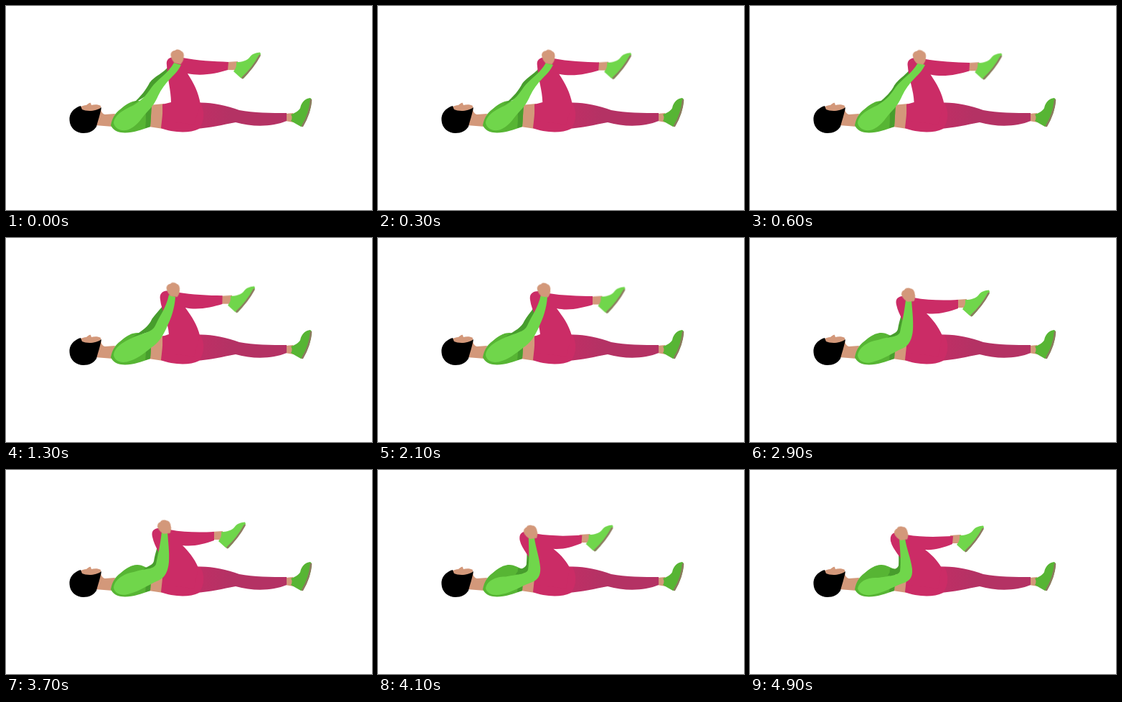
These frames come from a looping animation (510x284 px, 5000 ms). An HTML page without scripts:

```html
<!DOCTYPE html>
<html lang="en">
<head>
<meta charset="utf-8">
<title>Knee to chest stretch</title>
<style>
html, body { margin: 0; width: 100%; height: 100%; overflow: hidden; background: #fff; }
svg { display: block; width: 100vw; height: 100vh; }
.skin { fill: #d3987a; }
.pink { fill: #cb2c66; }
.green { fill: #57b534; }
.shade { fill: #479d2d; }
.light { fill: #70d64b; }
.sole { fill: none; stroke: #8d7a60; stroke-width: 2.6; stroke-linecap: round; }
.move { animation: 5s linear infinite; }
#leg { animation-name: leg; }
#arm { animation-name: arm; }
#back { animation-name: back; }
#foot { animation-name: foot; }
#hand { animation-name: hand; }

@keyframes foot {
  0% { transform: translate(0, 0); }
  34%, 42% { transform: translate(-10.5px, 3.5px); }
  48%, 74% { transform: translate(-21px, 8px); }
  84%, 100% { transform: translate(-29px, 13px); }
}
@keyframes hand {
  0% { transform: translate(238.5px, 70px) rotate(0deg); }
  34%, 42% { transform: translate(231px, 72px) rotate(-6deg); }
  48%, 74% { transform: translate(220.5px, 79px) rotate(-18deg); }
  84%, 100% { transform: translate(210.5px, 88px) rotate(-22deg); }
}
@keyframes leg {
  0% { d: path("M246 72C266 76 290 77 310 78L309 89C293 94 273 98 253 94C262 108 268 120 271 137L262 165L219 160L218 137L230 134C230 118 225 102 224 82C222 71 234 69 246 72Z"); }
  34%, 42% { d: path("M238 77C256 80 280 81 299 81L299 93C285 97 266 102 249 98C258 110 266 121 270 136L262 165L219 160L218 137L226 134C225 116 214 102 212 86C210 74 222 71 238 77Z"); }
  48%, 74% { d: path("M228 83C248 87 270 87 290 86L290 98C276 103 261 107 246 105C254 113 262 122 268 136L262 165L219 160L218 140L219 134C218 120 207 108 204 93C201 81 212 78 228 83Z"); }
  84%, 100% { d: path("M218 90C240 94 263 93 283 92L282 103C270 108 256 112 244 111C252 117 260 124 267 136L262 165L219 160L218 142L216 134C212 122 199 112 196 99C194 86 205 84 218 90Z"); }
}
@keyframes arm {
  0% { d: path("M234 79L244 82C240 90 235 95 230 100C222 108 216 116 212 125C208 134 204 140 198 146C190 154 184 166 173 171C163 176 152 172 150 163C151 151 165 144 178 138C191 130 197 122 203 113C211 102 226 94 234 79Z"); }
  34%, 42% { d: path("M227 79L236 82C235 98 230 112 225 122C220 134 214 144 206 150C196 157 186 167 173 171C163 175 152 173 150 163C151 151 165 144 178 138C192 132 204 131 208 122C214 108 223 98 227 79Z"); }
  48%, 74% { d: path("M217 86L225 86C226 100 228 115 227 128C226 140 222 150 212 154C198 160 186 169 173 172C162 176 152 173 150 164C151 152 165 144 178 142C192 137 206 139 209 131C212 116 215 104 217 86Z"); }
  84%, 100% { d: path("M208 95L216 95C218 110 224 122 226 138C227 150 222 155 212 158C198 163 186 171 173 173C163 176 152 173 150 165C152 154 165 149 178 150C192 148 207 147 209 141C211 128 209 112 208 95Z"); }
}
@keyframes back {
  0% { d: path("M230 79L238 81L207 118L174 138C184 130 193 120 199 109C204 98 223 93 230 79Z"); }
  34%, 42% { d: path("M226 81L232 82L211 130L177 138C187 131 197 127 202 119C207 108 219 98 226 81Z"); }
  48%, 74% { d: path("M213 89L219 89L212 135L190 140C196 133 204 134 206 127C208 113 213 106 213 89Z"); }
  84%, 100% { d: path("M206 96L213 96L212 144L192 147C196 138 205 139 207 133C208 120 206 110 206 96Z"); }
}
</style>
</head>
<body>
<svg viewBox="0 0 510 284" preserveAspectRatio="none">
  <defs>
    <linearGradient id="far" gradientUnits="userSpaceOnUse" x1="266" y1="0" x2="312" y2="0">
      <stop stop-color="#c02e65"/>
      <stop offset="1" stop-color="#b43264"/>
    </linearGradient>
  </defs>

  <!-- head and neck -->
  <path class="skin" d="M102 142C105 139 109 138 112 138C114 137 116 134 118 135L119 138C123 137 129 137 132 139C132 145 133 150 138 151L152 150L149 168L124 166L106 155Z"/>
  <path d="M104 139C94 142 87.500 150 88.500 159C89 170 98 177 108 177C116 177 122 174 126 168C128 160 131 152 133 141C126 147 112 147 106 144Z"/>

  <!-- torso -->
  <path class="skin" d="M200 138L220 136L219 171L199 168Z"/>
  <path class="green" d="M146 166C148 156 152 149 159 144C166 138 174 132 183 132C191 132 196 137 203 138C202 148 202 158 201 168C188 173 172 178 160 176C153 175 148 171 146 166Z"/>
  <path class="shade" d="M195 137L203 138C202 148 202 158 201 168L194 170C196 158 194 148 195 137Z"/>
  <path id="back" class="shade move"/>

  <!-- straight leg -->
  <path class="skin" d="M389 150L400 149L401 162L389 160Z"/>
  <path fill="url(#far)" d="M262 135C282 133 305 138 325 145C345 149 370 149 391 149L391 160C372 168 345 169 320 162C302 165 286 170 262 171Z"/>
  <path class="green" d="M397 151C403 149 408 146 410 142C412 133 417 129 424 128L426 130C426 142 420 158 414 167L411 168L397 160Q400 155 397 151Z"/>
  <path class="sole" d="M425 131C424 144 419 157 413 167"/>
  <path class="pink" d="M218 137C232 134 252 134 271 135C277 146 277 160 269 171C255 178 231 176 216 170C217 160 219 148 218 137Z"/>

  <!-- bent leg -->
  <g id="foot" class="move">
    <path class="skin" d="M308 78L323 77L322 89L308 89Z"/>
    <path class="light" d="M321 78C329 78 335 76 339 72C343 66 349 65 354 64.500L355 67C349 79 340 91 331 101L327 100L317 91Q322 85 321 78Z"/>
    <path class="sole" d="M353.500 69C347 81 339 91 329.500 100"/>
  </g>
  <path id="leg" class="pink move"/>

  <!-- near arm -->
  <path id="arm" class="light move"/>
  <path id="hand" class="skin move" d="M-9 -3C-8 -7 -5 -8 -3 -8C0 -11 4 -9 6 -7C9 -6 10 -2 9 2C9 6 7 8 5 11L-4 9C-5 7 -9 4 -9 -3Z"/>
</svg>
</body>
</html>
```
